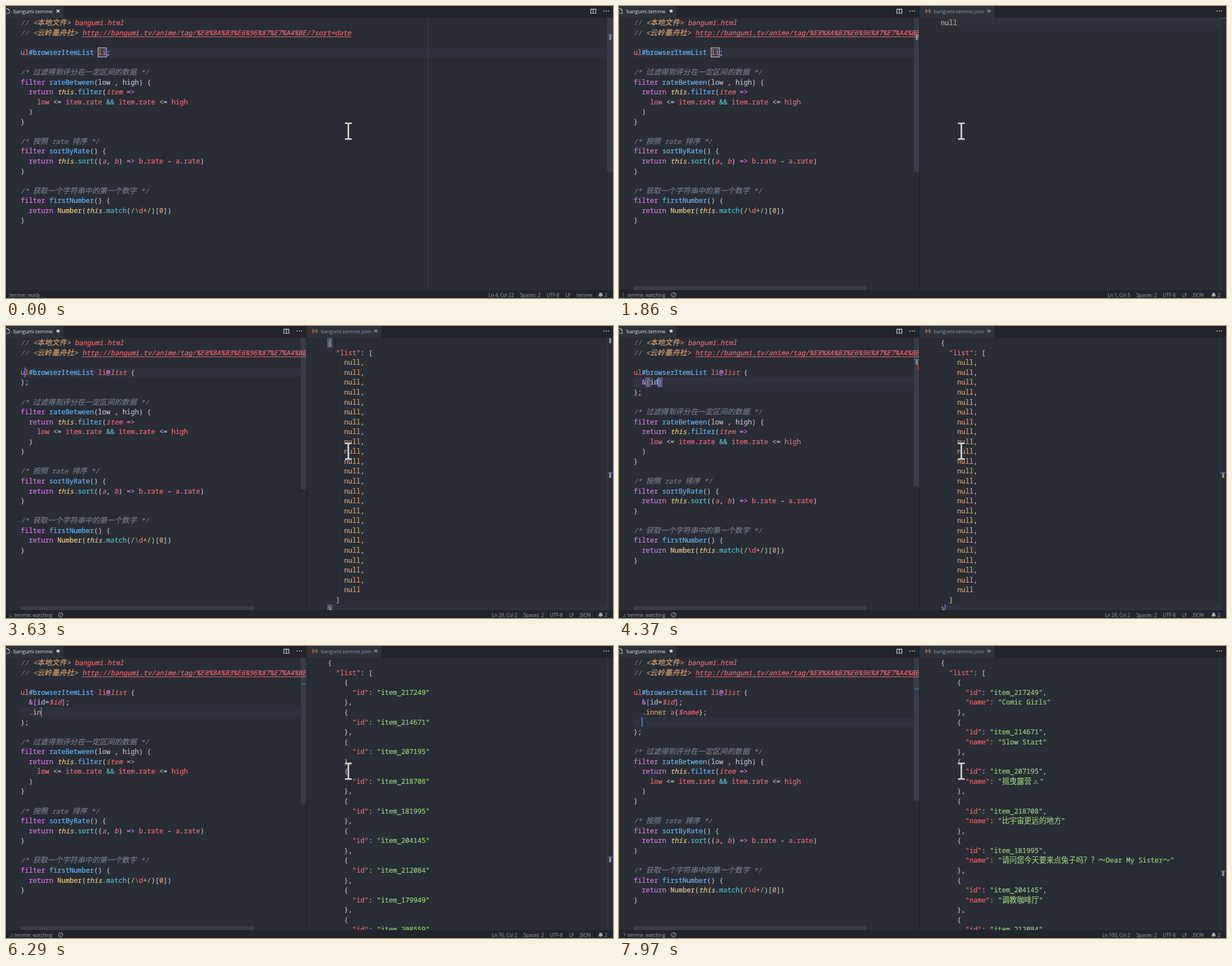
Recreate the animation shown at these times as an HTML page. Size 1078 px wide and 519 px high, loop 8 s.

```html
<!DOCTYPE html>
<html lang="en">
<head>
<meta charset="utf-8">
<title>Live selector editing</title>
<style>
  html, body { margin: 0; width: 100%; height: 100%; overflow: hidden; background: #282c34; }
  #stage { display: block; width: 1078px; height: 519px; }
  text { white-space: pre; stroke-width: .22px; }
  .code { font: 12.07px "Noto Sans Mono", "DejaVu Sans Mono", monospace; }
  .cjk { font: 13.17px "Noto Sans CJK SC", "Noto Sans CJK", sans-serif; }
  .italic { font-style: italic; }
  .ui { font: 9px "Open Sans", "Noto Sans", sans-serif; }
  .status { font: 8.4px "Open Sans", "Noto Sans", sans-serif; }
</style>
</head>
<body>
<svg id="stage" viewBox="0 0 1078 519"></svg>
<script>
const LOOP = 8000, CHAR = 7.242, WIDE = 13.17, LINE = 17.56;
const TOP = 21, VIEW = 484, LEFT_X = 26, RIGHT_X = 571.5;
const SLIDER = '#373c46', MARK = '#80858f';
const COLORS = { g: '#737a86', o: '#d8a06c', r: '#ee6672', b: '#66b5f5', w: '#b6bdca',
  p: '#d478e4', y: '#ebc680', c: '#4fbfcc', n: '#98cf7c' };
const stage = document.getElementById('stage');

// Code markup: parts split by "|", first letter is the colour, a capital means italic.
const HEAD = [
  'G// |O<本地文件>|R bangumi.html',
  'G// |O<云岭墨舟社>|R http://bangumi.tv/anime/tag/%E8%8A%B3%E6%96%87%E7%A4%BE/?sort=date',
  ''
];
const SELECTOR = 'rul|b#browserItemList|r li';
const TAIL = [
  '',
  'G/* 过滤得到评分在一定区间的数据 */',
  'pfilter|b rateBetween|w(low , high) {',
  'p  return|Y this|w.|bfilter|w(|Ritem|p =>',
  'r    low|w <= |ritem|w.|rrate|c && |ritem|w.|rrate|w <= |rhigh',
  'w  )',
  'w}',
  '',
  'G/* 按照 rate 排序 */',
  'pfilter|b sortByRate|w() {',
  'p  return|Y this|w.|csort|w((|Ra|w, |Rb|w)|p => |rb|w.|rrate|w - |ra|w.|rrate|w)',
  'w}',
  '',
  'G/* 获取一个字符串中的第一个数字 */',
  'pfilter|b firstNumber|w() {',
  'p  return|y Number|w(|Ythis|w.|cmatch|w(|n/|r\\d|o+|n/|w)[|o0|w])',
  'w}'
];
const TITLES = ['Comic Girls', 'Slow Start', '摇曳露营△', '比宇宙更远的地方',
  '请问您今天要来点兔子吗？？～Dear My Sister～', '调教咖啡厅', 'A频道 来吃火锅吧', 'NEW GAME!!',
  '雏子的笔记', '樱花任务', '悠悠式 OVA', '珈百璃的堕落', 'Urara迷路帖', '黄金拼图 Pretty Days',
  '斯特拉的魔法', 'NEW GAME!', '三者三叶', 'Anne Happy♪', '房东妹子青春期',
  '请问您今天要来点兔子吗？？', '摇曳百合 3☆High!', '小森同学拒绝不了！', '学园孤岛', '若叶女孩'];
const IDS = [217249, 214671, 207195, 218708, 181995, 204145, 212084, 179949, 208559];
const COMMANDS = ['Temme: Start watching', 'Temme: Run temme selector', 'Temme: Stop watching',
  'Add Cursor Above', 'Add Cursor Below', 'Add Cursors to Line Ends', 'Add Line Comment',
  'Add Selection To Next Find Match', 'Change All Occurrences', 'Change End of Line Sequence',
  'Change File Encoding', 'Change Language Mode'];

const clamp = (v, lo, hi) => Math.max(lo, Math.min(hi, v));
const at = (steps, t) => steps.reduce((value, [time, next]) => t >= time ? next : value, steps[0][1]);
const escape = s => s.replace(/&/g, '&amp;').replace(/</g, '&lt;').replace(/>/g, '&gt;').replace(/ /g, '\u00a0');
const rect = (x, y, w, h, fill, extra = '') =>
  `<rect x="${x}" y="${y}" width="${w}" height="${h}" fill="${fill}" ${extra}/>`;
const path = (d, stroke, width = 1, extra = '') =>
  `<path d="${d}" fill="none" stroke="${stroke}" stroke-width="${width}" ${extra}/>`;
const dot = (x, y, r, fill) => `<circle cx="${x}" cy="${y}" r="${r}" fill="${fill}"/>`;
const label = (s, x, y, fill, cls = 'ui', extra = '') =>
  `<text x="${x}" y="${y}" fill="${fill}" class="${cls}" ${extra}>${escape(s)}</text>`;
const bold = (s, from, to) => from >= to ? escape(s) :
  `${escape(s.slice(0, from))}<tspan font-weight="700" fill="#e6e9ef">${escape(s.slice(from, to))}</tspan>${escape(s.slice(to))}`;
const pane = (x, w, body) => `<svg x="${x}" y="${TOP}" width="${w}" height="${VIEW}" overflow="hidden">${body}</svg>`;

function codeLine(markup, x, row) {
  let out = '';
  for (const part of markup ? markup.split('|') : []) {
    const key = part[0], lower = key.toLowerCase(), color = COLORS[lower];
    for (const run of part.slice(1).match(/[☆\u3000-\u9fff\uff00-\uffef]+|[^☆\u3000-\u9fff\uff00-\uffef]+/g) || []) {
      const wide = /[☆\u3000-\u9fff\uff00-\uffef]/.test(run);
      const cls = (wide ? 'cjk' : 'code') + (key !== lower ? ' italic' : '');
      out += label(run, x.toFixed(2), (row * LINE + 13.2).toFixed(2), color, cls, `stroke="${color}"`);
      x += run.length * (wide ? WIDE : CHAR);
    }
  }
  return out;
}

function cut(markup, count) {
  const parts = [];
  for (const part of markup.split('|')) {
    if (count <= 0) break;
    parts.push(part.slice(0, count + 1));
    count -= part.length - 1;
  }
  return parts.join('|');
}

const rowBand = (x, row, right) => rect(x, row * LINE, right - x, LINE, '#2c313c');
const cursor = (x, row) => rect(x - 0.3, row * LINE, 1.5, LINE, '#528bff');
const bracket = (x, row) => rect(x, row * LINE + 0.8, CHAR, LINE - 1.6, '#4a5160', 'stroke="#7d838f" stroke-width=".8"');
const ratio = lines => VIEW / ((lines - 1) * LINE + VIEW);

function scrollbar(x, lines) {
  return rect(x, 0, 1, VIEW, '#23272e') + rect(x, 0, 10.5, VIEW * ratio(lines), SLIDER);
}

function overviewMark(x, row, lines, stem) {
  const y = row * LINE * ratio(lines);
  return rect(x, y - 0.6, 10, 1.3, '#4672bd') + (stem ? rect(x + 3, y + 0.5, 4, 9, MARK) : '');
}

function popup(x, row, items) {
  const h = items.length * LINE, y = row * LINE;
  let out = rect(x, y, 240, h, '#21252b', 'stroke="#181a1f"') + rect(x, y, 240, LINE, '#2c313a');
  items.forEach(([s, from, to], i) => {
    const base = y + i * LINE;
    out += rect(x + 3.5, base + 4, 11, 9.5, 'none', 'stroke="#a5a9b0" stroke-width=".9"') +
      label('abc', x + 4.7, base + 10.6, '#c5c8ce', 'ui', 'style="font-size:5px"') +
      `<text class="code" x="${x + 19}" y="${base + 13}" fill="#c6cbd4">${bold(s, from, to)}</text>`;
  });
  return out;
}

function leftEditor(t, split) {
  const w = split ? 534 : 1078, bar = w - 10.5;
  const n3 = at([[0, 0], [1930, 1], [2000, 2], [2070, 3], [2140, 5], [2210, 6], [2960, 7]], t);
  const n4 = t < 5190 ? clamp(Math.floor((t - 4070) / 73), 0, 6) : at([[5190, 7], [5250, 8], [5330, 9], [5400, 10]], t);
  const n5 = t < 7380 ? clamp(Math.floor((t - 6070) / 73), 0, 10)
    : t < 7700 ? 10 + clamp(Math.floor((t - 7380) / 80) + 1, 1, 4) : 16;

  let first = SELECTOR;
  if (n3) first += '|' + cut(t < 2960 ? 'r@list ' : 'p@|Rlist|w {', n3);
  const body = [first + (t < 2960 ? '|w;' : t < 3190 ? '|w};' : '')];
  if (t >= 4070) body.push(cut('w  |p&[|wid=|R$id|p]|w;', n4 + 2) + (n4 > 1 && n4 < 9 ? '|p]' : ''));
  if (t >= 6070) body.push(cut('o  .inner|r a|w{|R$name|w};', n5 + 2) + (n5 > 8 && n5 < 15 ? '|w}' : ''));
  if (t >= 7890) body.push('');
  if (t >= 3190) body.push('w};');

  let row = 3, col = 21 + n3;
  if (t >= 7890) [row, col] = [6, 2];
  else if (t >= 6070) [row, col] = [5, 2 + n5];
  else if (t >= 4070) [row, col] = [4, 2 + n4];
  else if (t >= 3490 && t < 3790) col = 1;

  const lines = HEAD.concat(body, TAIL), count = lines.length + 1;
  const inBrackets = row === 4 ? n4 > 1 && n4 < 9 : row === 5 && n5 > 8 && n5 < 15;
  const wordBox = t < 1930;
  let out = rowBand(LEFT_X, row, bar);
  if (!split) out += rect(749, 0, 1, VIEW, '#383c45');
  if (inBrackets) {
    const open = row === 4 ? 3 : 10;
    const close = (row === 4 ? Math.max(n4, 2) : n5) + 2;
    out += bracket(LEFT_X + open * CHAR, row) + bracket(LEFT_X + close * CHAR, row);
  }
  if (wordBox) out += rect(LEFT_X + 19 * CHAR, 3 * LINE + 0.6, 2 * CHAR, LINE - 1.2, '#3a3f4a', 'stroke="#d0d3d8"');

  out += scrollbar(bar, count) + overviewMark(bar + 0.5, row, count, wordBox || inBrackets);
  if (split) out += rect(26, 477, 414, 7, SLIDER);
  lines.forEach((s, i) => out += codeLine(s, LEFT_X, i));
  out += rect(135.3, 33.3, 66 * CHAR, 1, COLORS.r);

  const blinkOff = t >= 200 && t < 1860 || t >= 7230 && t < 7380;
  if (!blinkOff) out += cursor(LEFT_X + col * CHAR, row);

  const broken = row === 4 && n4 > 0 && n4 < 10;
  if (broken) out += path('M26 103.5l2 -2 2 2 2 -2 2 2 2 -2 2 2 2 -2', '#e0414d', 0.9);
  const errorRow = broken ? 5 : t >= 1930 && t < 2960 ? 3 : 0;
  if (errorRow) out += rect(w - 4, errorRow * LINE * ratio(count), 4, 9, '#b3262e');

  if (t >= 2210 && t < 2960) out += popup(222, 4, [['browserItemList', 11, 15]]);
  if (t >= 5190 && t < 5400) out += popup(LEFT_X + col * CHAR + 0.6, 5, [['id', 0, 2], ['item', 0, 1], ['browserItemList', 7, 8]]);
  return pane(0, w, out);
}

function jsonRows(t) {
  if (t < 3260) return { rows: ['onull'], count: 1 };
  const rows = ['w{', 'r  "list"|w: ['];
  const listed = t < 5630 || t >= 7030 && t < 7750;
  if (listed) {
    TITLES.forEach((s, i) => rows.push((t < 5630 ? 'o    null' : `n    "${s}"`) + (i < 23 ? '|w,' : '')));
    rows.push('w  ]', 'w}');
    return { rows, count: 28 };
  }
  const named = t >= 7750;
  IDS.forEach((id, i) => {
    rows.push('w    {', `r      "id"|w: |n"item_${id}"` + (named ? '|w,' : ''));
    if (named) rows.push(`r      "name"|w: |n"${TITLES[i]}"`);
    rows.push('w    },');
  });
  return { rows: rows.slice(0, 28), count: named ? 100 : 76 };
}

function rightEditor(t, { rows, count }) {
  const x = RIGHT_X - 534, last = count - 1;
  const matched = t >= 3260 && t < 3790 || t >= 5630 && t < 5910 || t >= 7030 && t < 7820;
  let out = last < 28 ? rowBand(x, last, 534) : '';
  if (matched) out += bracket(x, 0) + (last < 28 ? bracket(x, last) : '');
  rows.forEach((s, i) => out += codeLine(s, x, i));
  if (count === 28 && !matched) out += cursor(x + CHAR, last);
  out += rect(533.5, 0, 1, VIEW, '#383d47') + overviewMark(534, last, count, count > 1);
  if (matched) out += rect(537, 0.5, 4, 9, MARK);
  return pane(534, 544, out);
}

const moreDots = x => [-4, 0, 4].map(d => dot(x + d, 9, 1, '#c5c8ce')).join('');
const splitIcon = x => path(`M${x - 4.5} 5.5h9v7.5h-9zM${x} 5.5v7.5M${x - 4.5} 6h9`, '#c5c8ce', 1.2);

function tabs(split) {
  let out = rect(0, 0, 1078, TOP, '#21252b') + rect(0, 0, 102, TOP, '#2c313a');
  out += path('M0 4.5h3.5l2.5 2.5v6h-6M3.5 4.5v2.5h2.5', '#c5c8ce', 0.9);
  out += label('bangumi.temme', 13, 12.8, '#e0e3e8') + moreDots(1066);
  if (!split) return out + path('M90 6.6l5 5M95 6.6l-5 5', '#f0f2f5', 1.4) + splitIcon(1043);
  return out + dot(92.5, 9, 2.8, '#c5c8ce') + splitIcon(498) + moreDots(521) +
    rect(534, 0, 133, TOP, '#2c313a') +
    path('M546.2 5.5h-1v2.5l-1 1 1 1v2.5h1M550.8 5.5h1v2.5l1 1 -1 1v2.5h-1', '#e8824a', 1.1) +
    dot(548.5, 9, 1.3, '#e8824a') +
    label('bangumi.temme.json', 559, 12.8, '#8f959f') + dot(657, 9, 2.8, '#747a84');
}

function spinner(t) {
  const ring = [[0, 0], [1, 0], [1, 1], [1, 2], [1, 3], [0, 3], [0, 2], [0, 1]];
  const start = Math.floor(t / 120) + 6;
  return [0, 1, 2, 3].map(i => {
    const [x, y] = ring[(start + i) % 8];
    return dot(7.7 + x * 2.8, 510.6 + y * 2, 0.65, '#b4bac5');
  }).join('');
}

function statusBar(t, split, count) {
  const put = (s, x, extra) => label(s, x, 516.6, '#9da5b4', 'status', extra);
  const shift = split ? 6 : 0;
  const position = !split ? 'Ln 4, Col 22' : `Ln ${count}, Col ${count === 1 ? 5 : 2}`;
  let out = rect(0, 505, 1078, 14, '#21252b');
  out += split
    ? spinner(t) + put('temme: watching', 15) + path('M93 513.5a4 4 0 1 0 8 0a4 4 0 1 0 -8 0M99.8 510.7l-5.6 5.6', '#9da5b4', 1)
    : put('temme: ready', 6);
  out += put(position, 902 + shift, 'text-anchor="end"') + put('Spaces: 2', 913 + shift) + put('UTF-8', 960 + shift) +
    put('LF', 994 + shift) + put(split ? 'JSON' : 'temme', 1013 + shift) + put('2', 1063);
  return out + '<path d="M1051.5 516c1.8-1.5 1.2-3 1.8-4.6c.6-1.6 1.6-2 2.7-2.2c1.1 .2 2.1 .6 2.7 2.2c.6 1.6 0 3.1 1.8 4.6zM1054.8 516.6h2.4l-1.2 1.4z" fill="#9da5b4"/>';
}

function palette(t) {
  const query = at([[200, ''], [650, 't'], [730, 'te'], [810, 'tem'], [890, 'temm'], [950, 'temme'],
    [1110, 'temme '], [1180, 'temme s'], [1250, 'temme st']], t);
  const items = !query ? COMMANDS : query.length < 7 ? COMMANDS.slice(0, 3) : [COMMANDS[0], COMMANDS[2]];
  const h = 28 + items.length * 16.1;
  let out = rect(295.5, -6, 439, h + 6, '#1f2329', 'style="filter:drop-shadow(0 2px 3px #0009)"');
  out += rect(300.5, 0.5, 430, 18, '#1b1d23', 'stroke="#1c3c5c"');
  out += `<text class="ui" x="304.5" y="13" fill="#d0d4dc">&gt;${escape(query)}<tspan dx="0.3">|</tspan></text>`;
  out += rect(295.5, 22.8, 439, 16.1, '#3a3f4b');
  items.forEach((s, i) => {
    const matched = s.startsWith('Temme') ? Math.min(5, query.length) : 0;
    out += `<text class="ui" x="304" y="${34.2 + i * 16.1}" fill="#d0d4dc">${bold(s, 0, matched)}</text>`;
  });
  return out + label('recently used', 722, 34.2, '#1d6ca8', 'ui', 'text-anchor="end"');
}

function pointer() {
  const shape = 'M602 208.5h4.5l1.5 1 1.5 -1h4.5M602 236.5h4.5l1.5 -1 1.5 1h4.5M608 209v27';
  return path(shape, '#30343b', 4) + path(shape, '#deddd8', 2.6);
}

function scene(t) {
  const split = t >= 1860, json = jsonRows(t);
  let out = rect(0, 0, 1078, 519, '#282c34') + leftEditor(t, split);
  if (split) out += rightEditor(t, json);
  out += tabs(split);
  if (split) out += rect(533, 0, 1, 505, '#1e2127');
  out += statusBar(t, split, json.count);
  if (t >= 200 && t < 1640) out += palette(t);
  return out + pointer();
}

let shown = '';
function tick() {
  const markup = scene(performance.now() % LOOP);
  if (markup !== shown) stage.innerHTML = shown = markup;
  requestAnimationFrame(tick);
}
tick();
</script>
</body>
</html>
```
